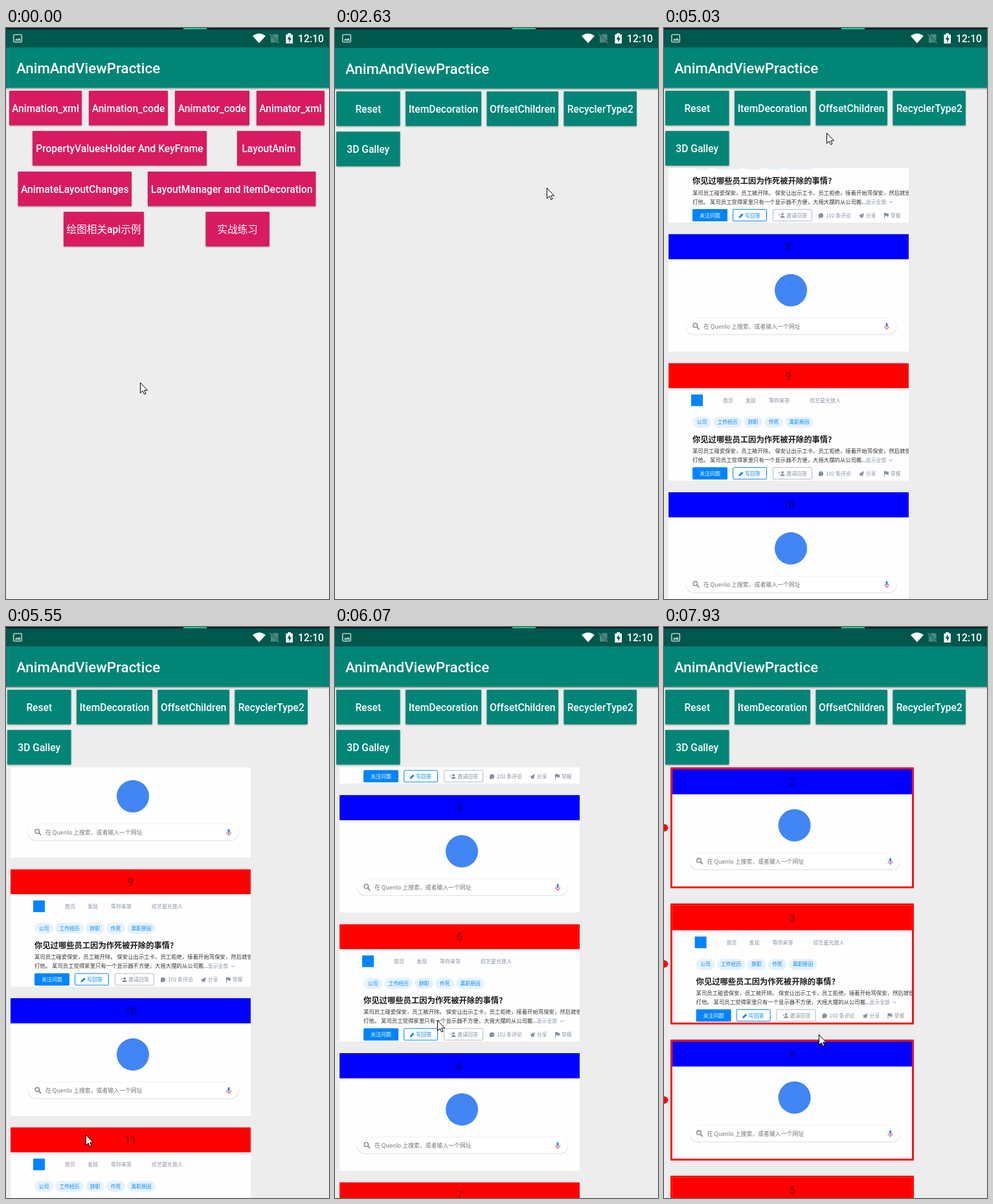
Animation, 499 px wide and 883 px high, one loop 7.99 s. Source, as an HTML page:

```html
<!DOCTYPE html>
<html lang="zh-CN">
<head>
<meta charset="utf-8">
<title>AnimAndViewPractice</title>
<style>
  html, body { margin: 0; width: 100%; height: 100%; overflow: hidden; background: #ededed; }
  #stage { display: block; width: 499px; height: 883px; }
  text { font-family: Roboto, "Noto Sans CJK SC", "Noto Sans CJK", sans-serif; white-space: pre; }
  .web text { font-family: "Noto Sans CJK SC", "Noto Sans CJK", sans-serif; }
  .button { filter: drop-shadow(0 1.5px 1px rgba(0, 0, 0, .35)); }
</style>
</head>
<body>
<svg id="stage" viewBox="0 0 499 883"></svg>
<script>
const LOOP = 7990;
const STEP = 58.1;
const ANCHOR = 4500;
const LIST_TOP = 217;
const ITEM_COUNT = 14;

const BLUE = '#0084ff', GREY = '#8590a6', TEAL = '#008577', PINK = '#d81b60';

// ---------- drawing helpers ----------
const rect = (x, y, w, h, fill, extra = '') =>
  `<rect x="${x}" y="${y}" width="${w}" height="${h}" fill="${fill}" ${extra}/>`;
const path = (d, fill, extra = '') => `<path d="${d}" fill="${fill}" ${extra}/>`;
// cy is the vertical middle of the glyphs
const label = (x, cy, size, fill, str, extra = '') =>
  `<text x="${x}" y="${cy + size * .36}" font-size="${size}" fill="${fill}" ${extra}>${str}</text>`;
const MIDDLE = 'text-anchor="middle"';

function button(left, right, top, color, str, id = '') {
  const w = right - left;
  return `<g class="button">${rect(left, top, w, 53.5, color, 'rx="1"')}</g>` +
    (id && rect(left, top, w, 53.5, '#fff', `id="${id}" opacity="0"`)) +
    label((left + right) / 2, top + 27.3, 15.6, '#fff', str, MIDDLE + ' font-weight="500"');
}

function page(id, buttons, list = '') {
  return `<g id="${id}">` +
    rect(0, 2, 499, 881, '#ededed') +
    list +
    rect(0, 92, 499, 4, 'url(#shade)') +
    rect(0, 2, 499, 28, '#00574b') +
    rect(0, 30, 499, 62.5, TEAL) +
    label(16, 62, 22.3, '#fff', 'AnimAndViewPractice', 'font-weight="500"') +
    buttons + '</g>';
}

function statusIcons() {
  return rect(11.7, 10.2, 12.6, 11.6, 'none', 'rx="1.5" stroke="#b5cfca" stroke-width="1.6"') +
    path('M13.5 19.5l2.6-3.6 2 2.2 2.2-3 3 4.4z', '#b5cfca') +
    path('M381 12.2q10-7.6 20 0L391 23.6z', '#fff') +
    path('M412.5 9.5h8v13h-11.5v-9.5z', '#4b8a80') +
    path('M407.5 9l14 14.5', 'none', 'stroke="#00574b" stroke-width="3"') +
    path('M407.5 9.5l14 14', 'none', 'stroke="#5f978e" stroke-width="1.3"') +
    path('M432.5 10h3V8h4.500v2h3v14h-10.500z', '#fff') +
    path('M438.6 11.500l-4 6h2.700v4.500l4-6.300h-2.700z', '#00574b') +
    label(451, 16.3, 15.8, '#fff', '12:10', 'font-weight="500"');
}

// ---------- list cards (371 x 182) ----------
function questionCard() {
  const nav = [[84, '首页'], [119, '发现'], [155, '等你来答'], [218, '综艺星光旅人']];
  const tags = [[37, 29, '公司'], [69, 44, '工作经历'], [116, 29, '辞职'], [148, 29, '作死'], [180, 44, '离职原因']];
  const outline = (x, w, color) =>
    rect(x, 161.5, w, 18, '#fff', `rx="1.5" stroke="${color}" stroke-width="1"`);
  return rect(0, 39, 371, 3, '#f2f2f2') +
    rect(35, 48.500, 18, 18, BLUE) +
    nav.map(([x, s]) => label(x, 58, 8, GREY, s)).join('') +
    tags.map(([x, w, s]) =>
      rect(x, 83, w, 17, '#e5f2ff', 'rx="8.5"') + label(x + w / 2, 91.5, 7.8, BLUE, s, MIDDLE)).join('') +
    label(37, 118, 12.3, '#1a1a1a', '你见过哪些员工因为作死被开除的事情?', 'font-weight="700"') +
    label(37, 135.7, 8.4, '#333', '某司员工碰瓷保安，员工被开除。 保安让出示工卡，员工拒绝，接着开始骂保安，然后就很') +
    label(37, 150, 8.4, '#333', '打他。 某司员工觉得家里只有一个显示器不方便，大摇大摆的从公司搬...') +
    label(305, 150, 7.8, GREY, '显示全部') +
    path('M341 149l2.500 2.500 2.500-2.500', 'none', `stroke="${GREY}"`) +
    rect(37, 161, 54, 19, BLUE, 'rx="1.5"') + label(64, 170.800, 8, '#fff', '关注问题', MIDDLE) +
    outline(99.5, 52, BLUE) + label(118, 170.800, 8, BLUE, '写回答') +
    path('M108.500 175l.7-2.700 4.300-4.500 2 2-4.300 4.500z', BLUE) +
    outline(161.5, 60, '#b3bac8') + label(182, 170.800, 8, GREY, '邀请回答') +
    `<circle cx="176" cy="169" r="1.900" fill="${GREY}"/>` +
    path('M172.500 174.500q0-3 3.500-3t3.500 3zM170 169.500h3v1h-3z', GREY) +
    `<circle cx="235.500" cy="171" r="3.600" fill="${GREY}"/>` + path('M232 172v3.200l3-1z', GREY) +
    label(243, 170.800, 8, GREY, '102 条评论') +
    path('M294 171l8-4-2 8-2.300-1.500-1.700 1.800v-3z', GREY) + label(305, 170.800, 7.8, GREY, '分享') +
    path('M333 167h4l.500 1h2.500v4.500h-3l-.500-1h-2.500v4h-1z', GREY) + label(343, 170.800, 7.8, GREY, '举报');
}

function searchCard() {
  return '<circle cx="189" cy="87" r="25" fill="#4285f4"/>' +
    rect(26.5, 130.5, 326.5, 25.5, '#dcdee1', 'rx="12.7"') +
    rect(27, 129.7, 325.5, 25.3, '#fff', 'rx="12.6"') +
    path('M40 129.700H340', 'none', 'stroke="#eee" stroke-width=".8"') +
    '<circle cx="41.300" cy="141.300" r="3.200" fill="none" stroke="#777" stroke-width="1.300"/>' +
    path('M43.700 143.700l3.600 3.600', 'none', 'stroke="#777" stroke-width="1.500"') +
    label(54, 143, 8.9, '#757575', '在 Quenlo 上搜索，或者输入一个网址') +
    rect(335.5, 137.5, 3.2, 6.5, '#4285f4', 'rx="1.6"') +
    path('M333.600 142.500q0 3.600 3.500 3.600t3.500-3.600M337.100 146v2.300', 'none', 'stroke="#ea4335" stroke-width="1"');
}

function item(n) {
  const odd = n % 2;
  return `<g class="item"><svg width="371" height="182" class="web">` +
    rect(0, 0, 371, 182, '#fefefe') +
    rect(0, 0, 371, 39, odd ? '#f00' : '#00f') +
    (odd ? questionCard() : searchCard()) + '</svg>' +
    label(185.5, 20, 15.6, '#000', n, MIDDLE + ' fill-opacity=".54"') +
    '<g class="decor">' +
    rect(-1.2, -1.2, 373.2, 184.2, 'none', 'stroke="#f00" stroke-width="2.8"') +
    '<circle cx="-12.1" cy="90.900" r="5.700" fill="#f00"/></g></g>';
}

// ---------- scene ----------
const ROWS = [97, 159.3, 222, 284.3];
const menu = [
  [5, 117, 0, 'Animation_xml'], [128, 250, 0, 'Animation_code'],
  [261, 376, 0, 'Animator_code'], [387, 492, 0, 'Animator_xml'],
  [41, 310, 1, 'PropertyValuesHolder And KeyFrame'], [357, 455, 1, 'LayoutAnim'],
  [18.5, 194, 2, 'AnimateLayoutChanges'], [219, 478.5, 2, 'LayoutManager and itemDecoration'],
  [89, 213, 3, '绘图相关api示例'], [308.5, 407, 3, '实战练习']
];
const tools = [
  [2, 100.5, 0, 'Reset', 'resetGlow'], [109, 226, 0, 'ItemDecoration', 'decorGlow'],
  [234.5, 345, 0, 'OffsetChildren'], [353.5, 466, 0, 'RecyclerType2'], [2, 100.5, 1, '3D Galley']
];
const buttons = (specs, color) =>
  specs.map(([l, r, row, s, id]) => button(l, r, ROWS[row], color, s, id)).join('');
const items = Array.from({ length: ITEM_COUNT }, (_, i) => item(i + 1)).join('');

const $ = id => document.getElementById(id);
$('stage').innerHTML =
  `<defs><linearGradient id="shade" x2="0" y2="1"><stop stop-opacity=".38"/><stop offset="1" stop-opacity="0"/></linearGradient></defs>` +
  page('menuPage', buttons(menu, PINK)) +
  page('listPage', buttons(tools, TEAL),
    `<svg id="list" y="${LIST_TOP}" width="499" height="${883 - LIST_TOP}">${items}</svg>`) +
  statusIcons() +
  rect(0, 0, 499, 2, '#111a22') + rect(274, 0, 36, 2, '#1fc795') +
  '<g id="cursor">' +
  path('M.5.5V16.500L4.200 13 6.600 18.300 9 17.300 6.700 12.200H11.500z', '#fff', 'stroke="#000"') + '</g>';

// ---------- motion: [time, ...values] ----------
const CURSOR = [
  [0, 207, 548], [60, 207, 548], [840, 402, 215], [900, 402, 213], [1250, 396, 183],
  [1870, 396, 183], [2100, 254, 230], [2280, 327, 246], [2520, 327, 246], [2580, 327, 247],
  [2700, 327, 247], [3270, 81, 147], [4500, 81, 147], [4616, 235, 720], [4790, 253, 250],
  [5023, 251, 162], [5255, 200, 270], [5371, 165, 420], [5546, 123, 785], [5604, 123, 800],
  [6068, 158, 608], [6400, 170, 400], [6800, 150, 128], [7050, 150, 128],
  [7520, 243, 852], [7928, 239, 630]
];
const SCROLL = [
  [4616, 0], [4790, 470], [5023, 1305], [5140, 1600], [5255, 1740], [5371, 1813],
  [5546, 1448], [5604, 1400], [5790, 950], [6068, 566], [6300, 230], [6600, 0],
  [7520, 0], [7928, 222]
];
const PAGE_Y = [[2460, 24], [2520, 12], [2580, 1], [2640, 1], [2690, 0]];
const PAGE_ALPHA = [[2460, .3], [2520, .6], [2580, 1]];

function at(keys, t) {
  const i = keys.findIndex(k => k[0] > t);
  if (i === 0) return keys[0].slice(1);
  if (i < 0) return keys[keys.length - 1].slice(1);
  const [a, b] = [keys[i - 1], keys[i]];
  const p = (t - a[0]) / (b[0] - a[0]);
  return a.slice(1).map((v, j) => v + (b[j + 1] - v) * p);
}

const move = (el, x, y) => el.setAttribute('transform', `translate(${x} ${y})`);
const show = (el, on) => el.setAttribute('display', on ? 'inline' : 'none');
const between = (t, a, b) => t >= a && t < b;
const itemNodes = [...document.querySelectorAll('.item')];
const decorNodes = [...document.querySelectorAll('.decor')];

function draw(time) {
  const t = ANCHOR + Math.floor((time - ANCHOR) / STEP) * STEP;
  const [x, y] = at(CURSOR, t);
  move($('cursor'), Math.round(x), Math.round(y));

  show($('listPage'), t >= 2490);
  move($('listPage'), 0, at(PAGE_Y, t)[0]);
  $('listPage').setAttribute('opacity', at(PAGE_ALPHA, t)[0]);
  $('resetGlow').setAttribute('opacity', between(t, 3490, 3610) ? .14 : 0);
  $('decorGlow').setAttribute('opacity', between(t, 6930, 7110) ? .14 : 0);

  show($('list'), t >= 3550);
  const decorated = t >= 7050;
  const scroll = at(SCROLL, t)[0];
  const [left, top, pitch] = decorated ? [12.6, 14.1, 210.5] : [7, 9, 199.6];
  itemNodes.forEach((node, i) => {
    const itemY = top + pitch * i - scroll;
    move(node, left, itemY);
    show(node, itemY > -190 && itemY < 670);
    show(decorNodes[i], decorated);
  });
}

const start = performance.now();
function tick() {
  draw((performance.now() - start) % LOOP);
  requestAnimationFrame(tick);
}
tick();
</script>
</body>
</html>
```
